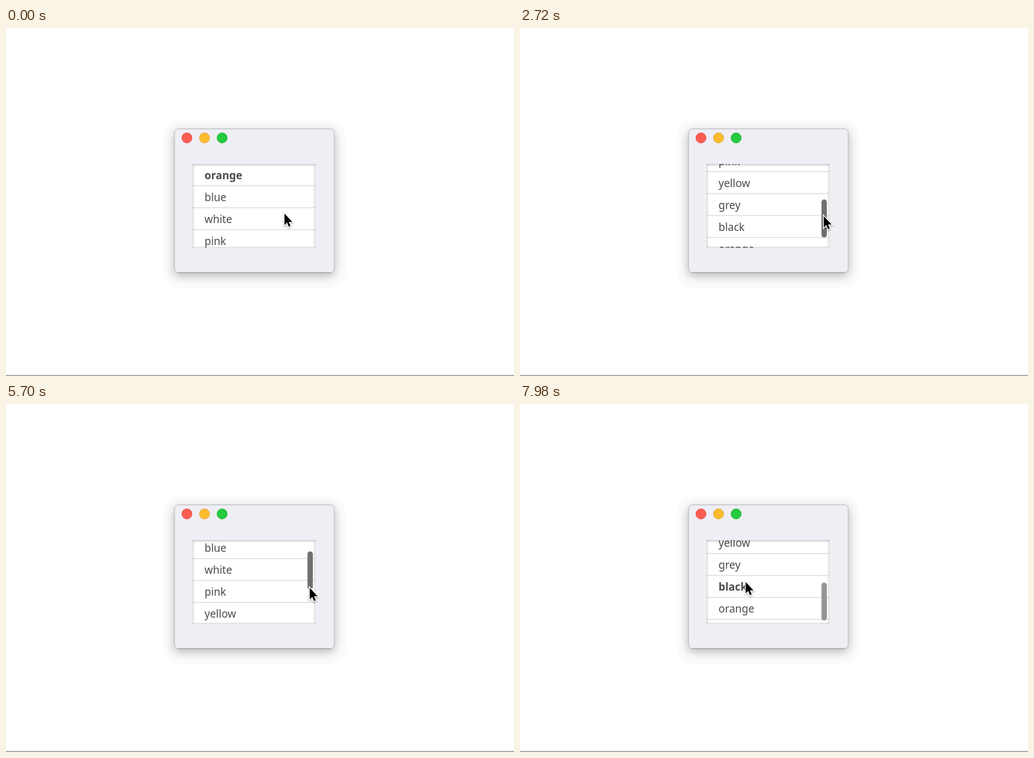
These frames come from a looping animation (904x619 px, 8000 ms). An HTML page with a canvas:

```html
<!DOCTYPE html>
<html lang="en">
<head>
<meta charset="utf-8">
<title>Scrolling list</title>
<style>
html, body { margin: 0; width: 100%; height: 100%; overflow: hidden; background: #fff; }
canvas { display: block; }
</style>
</head>
<body>
<canvas id="stage" width="904" height="619"></canvas>
<script>
const ctx = document.getElementById('stage').getContext('2d');
const LOOP = 8000;
const ROW = 39.07;
const LIST = { x: 332, y: 242, w: 218.5, h: 149 };
const WINDOW = [300, 179.5, 284, 255.5, 6.5];
const COLORS = ['orange', 'blue', 'white', 'pink', 'yellow', 'grey', 'black', 'orange'];

const linear = u => u;
const easeOut = u => 1 - (1 - u) ** 3;
const easeInOut = u => u * u * (3 - 2 * u);

const START = { scroll: 0, x: 495.5, y: 330 };
const MOVES = [
  // two flicks of the wheel
  { from: 10, until: 760, to: { scroll: 59 }, ease: easeOut },
  { from: 850, until: 2120, to: { scroll: 142.3 }, ease: easeOut },
  // grab the thumb and drag it up
  { from: 2220, until: 2440, to: { x: 540.5, y: 334.5 }, ease: easeInOut },
  { from: 2880, until: 4100, to: { scroll: 26, y: 282.5 }, ease: easeOut },
  // leave the thumb, come back lower and drag it down
  { from: 4260, until: 4650, to: { x: 526, y: 298 }, ease: easeInOut },
  { from: 4650, until: 5180, to: { x: 540.5, y: 319 }, ease: easeInOut },
  { from: 5580, until: 6512, to: { scroll: 170.8, y: 381.5 }, ease: linear },
  // select a row
  { from: 6960, until: 7540, to: { x: 400.5, y: 329.5 }, ease: easeInOut },
  { from: 7940, until: 7980, to: { x: 401.5, y: 316.5 }, ease: linear }
];

function poseAt(t) {
  const pose = { ...START };
  for (const { from, until, to, ease } of MOVES) {
    if (t <= from) break;
    const u = ease(Math.min(1, (t - from) / (until - from)));
    for (const key in to) pose[key] += (to[key] - pose[key]) * u;
  }
  return pose;
}

const between = (t, a, b) => t >= a && t < b;
const thumbActive = t => between(t, 2720, 4440) || between(t, 5340, 6780);

function paint(fill, stroke) {
  ctx.fillStyle = fill;
  ctx.fill();
  if (!stroke) return;
  ctx.strokeStyle = stroke;
  ctx.lineWidth = 1;
  ctx.stroke();
}

function roundRect(x, y, w, h, r, fill, stroke) {
  ctx.beginPath();
  ctx.roundRect(x, y, w, h, r);
  paint(fill, stroke);
}

function drawWindow() {
  ctx.fillStyle = '#fff';
  ctx.fillRect(0, 0, 904, 619);
  ctx.fillStyle = '#88868a';
  ctx.fillRect(0, 617.3, 904, 1.4);

  roundRect(279, 164, 326, 299, 30, '#fbfbfb');
  ctx.save();
  ctx.shadowColor = 'rgba(0,0,0,.3)';
  ctx.shadowBlur = 17;
  ctx.shadowOffsetY = 5;
  roundRect(...WINDOW, '#efeef4');
  ctx.restore();
  roundRect(...WINDOW, '#efeef4', '#b5b4b8');
  ctx.fillStyle = '#a09fa3';
  ctx.fillRect(306, 434.5, 272, 1);

  [['#ff5c52', '#e2463f'], ['#fdbc2e', '#dfa32b'], ['#25ca3f', '#20b034']].forEach((pair, i) => {
    ctx.beginPath();
    ctx.arc(322 + i * 31.3, 195.5, 9, 0, Math.PI * 2);
    paint(...pair);
  });
}

// A soft band fading inwards from one edge of the list.
function edgeShade(x0, y0, x1, y1, alpha) {
  const g = ctx.createLinearGradient(x0, y0, x1, y1);
  g.addColorStop(0, `rgba(0,0,0,${alpha})`);
  g.addColorStop(0.35, `rgba(0,0,0,${alpha * 0.35})`);
  g.addColorStop(1, 'rgba(0,0,0,0)');
  ctx.fillStyle = g;
  ctx.fillRect(LIST.x, LIST.y, LIST.w, LIST.h);
}

function drawList(t, scroll) {
  const { x, y, w, h } = LIST;
  const selected = t >= 7800 ? 6 : 0;
  ctx.save();
  ctx.beginPath();
  ctx.rect(x, y, w, h);
  ctx.clip();
  ctx.fillStyle = '#fff';
  ctx.fillRect(x, y, w, h);

  COLORS.forEach((name, i) => {
    const top = i * ROW - scroll;
    ctx.fillStyle = '#dcdcdd';
    ctx.fillRect(x, top + 279.8, w, 1.5);
    ctx.font = `${i === selected ? 'bold ' : ''}19px "Noto Sans", sans-serif`;
    ctx.fillStyle = '#4c4c4d';
    ctx.fillText(name, 353.2, top + 268.8);
  });

  edgeShade(0, y, 0, y + 6, 0.24);
  edgeShade(0, y + h, 0, y + h - 4, 0.18);
  edgeShade(x, 0, x + 5, 0, 0.18);
  edgeShade(x + w, 0, x + w - 5, 0, 0.18);

  if (t >= 20) {
    roundRect(536.5, 242.5 + scroll * 0.44, 9.5, 67.5, 4.75, thumbActive(t) ? '#707070' : '#959595');
  }
  ctx.restore();
}

function drawCursor(x, y) {
  const arrow = [[0, 0], [0, 20.5], [4.6, 16.1], [7.7, 23.5], [10.8, 22.1], [7.7, 14.9], [14, 14.9]];
  ctx.save();
  ctx.translate(x, y);
  ctx.beginPath();
  arrow.forEach(point => ctx.lineTo(...point));
  ctx.closePath();
  ctx.shadowColor = 'rgba(0,0,0,.35)';
  ctx.shadowBlur = 3;
  ctx.shadowOffsetY = 1.5;
  ctx.lineWidth = 3;
  ctx.strokeStyle = '#fff';
  ctx.stroke();
  ctx.shadowColor = 'transparent';
  paint('#000');
  ctx.restore();
}

function frame() {
  const t = performance.now() % LOOP;
  const { scroll, x, y } = poseAt(t);
  drawWindow();
  drawList(t, scroll);
  drawCursor(x, y);
  requestAnimationFrame(frame);
}
frame();
</script>
</body>
</html>
```
